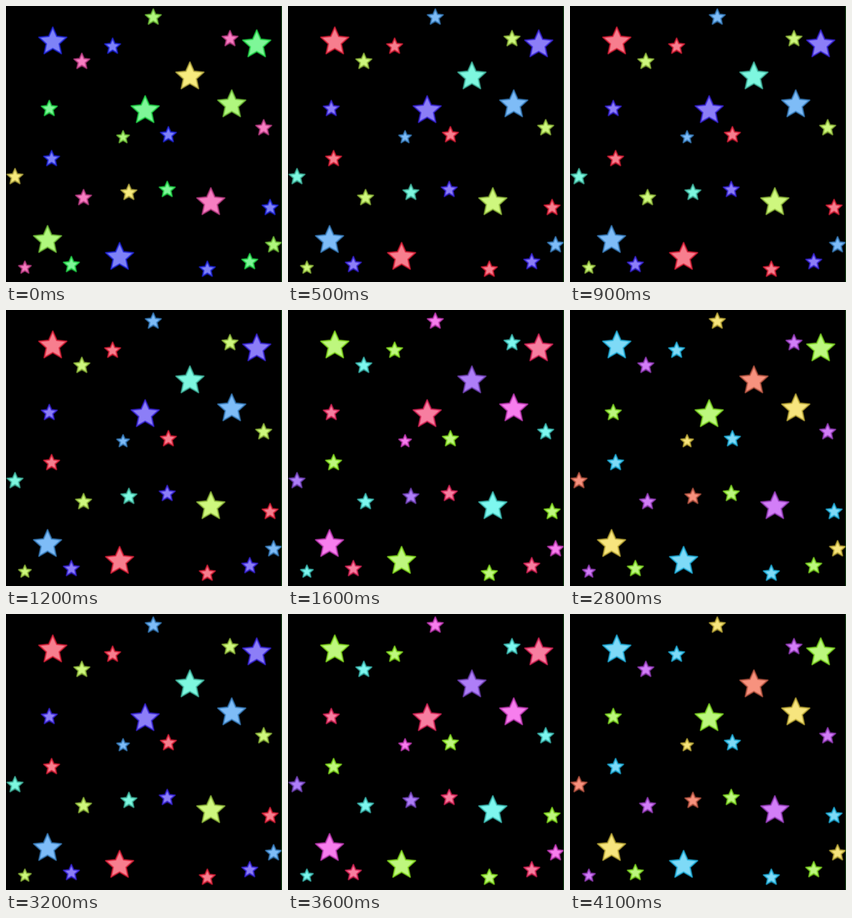
Recreate the animation shown at these times as an HTML page with a canvas. Size 475 by 474 pixels, loop 4.2 s.

```html
<!DOCTYPE html>
<html lang="en">
<head>
<meta charset="utf-8">
<title>Twinkling stars</title>
<style>
html, body { margin: 0; width: 100%; height: 100%; overflow: hidden; background: #000; }
canvas { display: block; }
</style>
</head>
<body>
<canvas id="sky" width="475" height="474"></canvas>
<script>
const ctx = document.getElementById('sky').getContext('2d');
const LOOP = 4200, TICK = 100;

// Every 1/12 s the whole sky jumps to the next hue shift, seen at 10 pictures a second.
const STEPS_PER_TICK = 1.2;
const hueShifts = [0, -44, 114, 210];

const groups = {
  blue:   { hue: 238, edge: 78 },
  lime:   { hue: 95,  edge: 55 },
  pink:   { hue: 326, edge: 52 },
  green:  { hue: 133, edge: 75 },
  yellow: { hue: 54,  edge: 48 }
};

// Star centres by radius and group.
const field = {
  25: {
    blue: [[80, 61], [195, 431]],
    lime: [[388, 169], [71, 402]],
    pink: [[352, 337]],
    green: [[431, 66], [239, 179]],
    yellow: [[316, 121]]
  },
  14: {
    blue: [[183, 69], [279, 221], [78, 262], [454, 346], [346, 452]],
    lime: [[253, 19], [460, 410]],
    pink: [[130, 95], [385, 56], [443, 209], [133, 329]],
    green: [[74, 176], [277, 315], [112, 444], [419, 439]],
    yellow: [[15, 293], [211, 320]]
  },
  11: { lime: [[201, 225]], pink: [[32, 449]] }
};

function starPath(x, y, radius) {
  ctx.beginPath();
  for (let i = 0; i < 10; i++) {
    const r = i % 2 ? radius * 0.47 : radius;
    const a = i * Math.PI / 5;
    ctx.lineTo(x + r * Math.sin(a), y - r * Math.cos(a));
  }
  ctx.closePath();
}

function strokeSoft(width, alpha) {
  ctx.lineWidth = width;
  ctx.globalAlpha = alpha;
  ctx.stroke();
  ctx.globalAlpha = 1;
}

function drawStar(x, y, radius, group, shift) {
  const hue = group.hue + shift;
  starPath(x + 0.5, y + 0.5, radius);
  ctx.fillStyle = `hsl(${hue}, 88%, 73%)`;
  ctx.fill();
  ctx.strokeStyle = `hsl(${hue}, ${group.edge}%, 48%)`;
  strokeSoft(3.6, 0.35);
  strokeSoft(2, 0.65);
}

function draw(time) {
  const tick = Math.floor(time % LOOP / TICK);
  const shift = hueShifts[Math.floor(tick * STEPS_PER_TICK + 0.01) % hueShifts.length];
  ctx.fillStyle = '#000';
  ctx.fillRect(0, 0, 475, 474);
  for (const [radius, sets] of Object.entries(field))
    for (const [name, spots] of Object.entries(sets))
      for (const [x, y] of spots) drawStar(x, y, +radius, groups[name], shift);
  ctx.fillStyle = '#1c5a1c';
  ctx.fillRect(474, 0, 1, 474);
}

ctx.lineJoin = 'round';
const start = performance.now();
function loop() {
  draw(performance.now() - start);
  requestAnimationFrame(loop);
}
loop();
</script>
</body>
</html>
```
